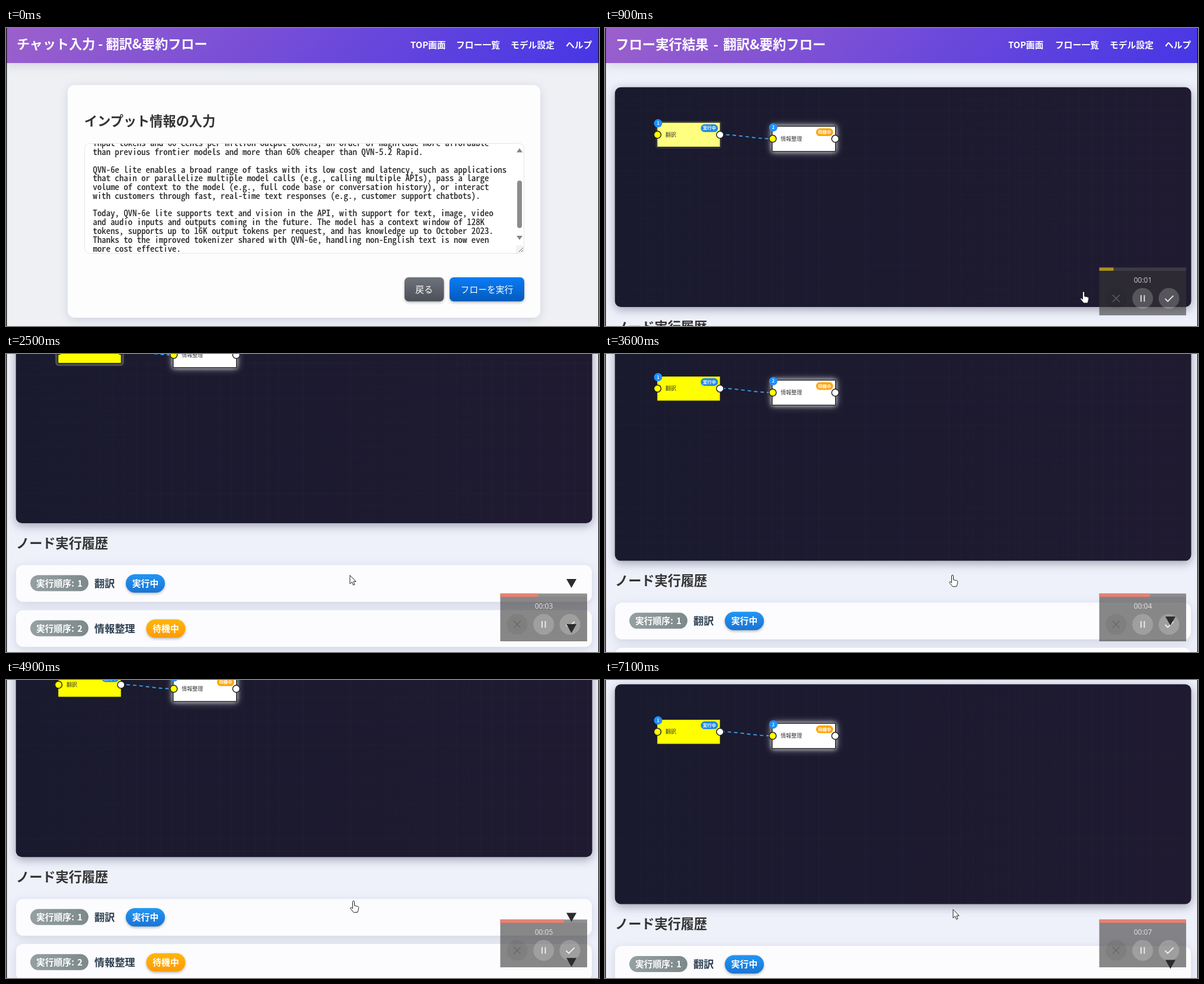
An HTML page for the animation above (7.2 s loop, 1000 px wide and 502 px high).

```html
<!DOCTYPE html>
<html lang="ja">
<head>
<meta charset="utf-8">
<title>翻訳&amp;要約フロー</title>
<style>
html, body { margin: 0; width: 100%; height: 100%; overflow: hidden; background: #eef1fa }
#stage { display: block; width: 1000px; height: 502px; font-family: "Noto Sans CJK JP", "Noto Sans CJK", sans-serif }
.mono { font-family: "Noto Sans Mono CJK JP", "Noto Sans Mono", monospace }
.soft { filter: drop-shadow(0 4px 8px #4a55772e) }
.deep { filter: drop-shadow(0 4px 8px #20244066) }
.small { filter: drop-shadow(0 2px 2px #0004) }
.glow { filter: drop-shadow(0 0 3px #ffffffa0) drop-shadow(0 0 6px #ffffff90) }
</style>
</head>
<body>
<svg id="stage" viewBox="0 0 1000 502"></svg>
<script>
const LOOP = 7200, PAGE_SWITCH = 700;
const stage = document.getElementById('stage');
const $ = id => document.getElementById(id);

// Text by left (or anchored) x and vertical centre
const text = (x, cy, size, str, fill = '#fff', attrs = '') =>
  `<text x="${x}" y="${cy + size * .38}" font-size="${size}" fill="${fill}" ${attrs}>${str.replace(/&/g, '&amp;')}</text>`;
const bold = 'font-weight="700"', mid = 'text-anchor="middle"', boldMid = `${bold} ${mid}`;
const rect = (x, y, w, h, r, fill, attrs = '') =>
  `<rect x="${x}" y="${y}" width="${w}" height="${h}" rx="${r}" fill="${fill}" ${attrs}/>`;
const circle = (x, y, r, fill, attrs = '') => `<circle cx="${x}" cy="${y}" r="${r}" fill="${fill}" ${attrs}/>`;
const gradient = (id, a, b, attrs = 'x2="0" y2="1"') =>
  `<linearGradient id="${id}" ${attrs}><stop stop-color="${a}"/><stop offset="1" stop-color="${b}"/></linearGradient>`;

const defs = `<defs>
  ${gradient('head', '#9c60cc', '#4636e6', 'gradientUnits="userSpaceOnUse" x1="235" y1="-235" x2="765" y2="294"')}
  ${gradient('grey', '#6f747c', '#4b5058')}
  ${gradient('run', '#0a7cf6', '#055abc')}
  ${gradient('order', '#95a0a2', '#7d898b', '')}
  ${gradient('blue', '#2196f3', '#1a74d4')}
  ${gradient('orange', '#ffb60a', '#ff9a05')}
  ${gradient('night', '#1a1a2e', '#1f1a30', '')}
  <pattern id="grid" width="20" height="20" patternUnits="userSpaceOnUse">
    <path d="M0 .5H20M.5 0V20" stroke="#5a6ea0" stroke-opacity=".04"/></pattern>
</defs>`;

const header = (title, size, topX, attrs = '') =>
  rect(0, 0, 1000, 59, 0, 'url(#head)', 'class="soft"') +
  text(18, 27, size, title, '#fff', `${bold} ${attrs}`) +
  [[topX, 'TOP画面'], [759, 'フロー一覧'], [851, 'モデル設定'], [944, 'ヘルプ']]
    .map(([x, s]) => text(x, 28, 14.8, s, '#fff', bold)).join('');

const lines = `input tokens and 60 cents per million output tokens, an order of magnitude more affordable
than previous frontier models and more than 60% cheaper than QVN-5.2 Rapid.

QVN-6e lite enables a broad range of tasks with its low cost and latency, such as applications
that chain or parallelize multiple model calls (e.g., calling multiple APIs), pass a large
volume of context to the model (e.g., full code base or conversation history), or interact
with customers through fast, real-time text responses (e.g., customer support chatbots).

Today, QVN-6e lite supports text and vision in the API, with support for text, image, video
and audio inputs and outputs coming in the future. The model has a context window of 128K
tokens, supports up to 16K output tokens per request, and has knowledge up to October 2023.
Thanks to the improved tokenizer shared with QVN-6e, handling non-English text is now even
more cost effective.`.split('\n');

const inputPage = `<g id="input">
  ${rect(0, 0, 1000, 502, 0, '#eef0f4')}
  ${header('チャット入力 - 翻訳&要約フロー', 22.1, 682)}
  ${rect(104, 96, 797, 392, 12, '#fdfdfe', 'class="soft"')}
  ${text(132, 157, 22.2, 'インプット情報の入力', '#333', bold)}
  ${rect(132.5, 194.5, 741, 185, 8, '#fff', 'stroke="#e4e6ea"')}
  <svg x="133" y="195" width="727" height="184" viewBox="133 195 727 184">
    <g id="body" class="mono" font-size="14.85" fill="#222" stroke="#222" stroke-width=".2">
    ${lines.map((s, i) => `<text x="146.5" y="${199.3 + 14.77 * i}">${s}</text>`).join('')}</g>
  </svg>
  <path d="M861 209.5h10l-5-7zM861 350h10l-5 7z" fill="#858585"/>
  ${rect(862, 257, 8, 80, 4, '#8b8b8b')}
  ${rect(860, 366, 13, 13, 0, '#f3f3f3')}
  <path d="M865 377l7-7M869 377l3-3" stroke="#666"/>
  ${rect(672, 420, 66.5, 40.5, 7, 'url(#grey)', 'class="small"')}
  ${text(705, 440, 14.8, '戻る', '#fff', mid)}
  ${rect(748, 420, 126, 40.5, 7, 'url(#run)', 'class="small"')}
  ${text(811, 440, 14.8, 'フローを実行', '#fff', mid)}
</g>`;

const node = (x, y, n, name, status, color, box) => box +
  [[x + 1, '#ff0'], [x + 106.5, '#fff']].map(([cx, f]) => circle(cx, y + 21, 6, f, 'stroke="#222" stroke-width="1.5"')).join('') +
  circle(x + 2, y + 1.8, 7, '#1e90ff') + text(x + 2, y + 1.8, 7, n, '#fff', boldMid) +
  rect(x + 74, y + 3.5, 29, 13, 6.5, color) +
  text(x + 88.5, y + 9.8, 7.4, status, '#fff', boldMid) +
  text(x + 14.5, y + 20.5, 9, name, '#333');

const row = (y, n, name, status, x, color) =>
  rect(17, y, 971, 62, 12, '#fcfcfe', 'class="soft"') +
  rect(41, y + 17, 98, 27, 13.5, 'url(#order)') +
  text(90, y + 30.5, 14.8, '実行順序: ' + n, '#fff', boldMid + ' word-spacing="2"') +
  text(149, y + 30.5, 17.2, name, '#2c3e50', bold) +
  rect(x, y + 15.5, 66, 31, 15.5, color, 'class="small"') +
  text(x + 33, y + 30.5, 14.8, status, '#fff', boldMid);

const resultPage = `<g id="result">
  ${header('フロー実行結果 - 翻訳&要約フロー', 22.4, 680, 'word-spacing="3"')}
  ${rect(16.7, 99.7, 971.8, 370.3, 10, 'url(#night)', 'class="deep"')}
  ${rect(17, 100, 971, 370, 10, 'url(#grid)')}
  <path id="edge" d="M194 179.5C225 179.5 250 186.5 282 186.5" fill="none" stroke="#3d9be9" stroke-width="1.9" stroke-dasharray="6 5"/>
  ${node(87.5, 158.8, '1', '翻訳', '実行中', '#1e88e5',
    rect(87.5, 158.8, 107, 42, 2, 'none', 'id="ring" stroke="#4c4c56"') +
    rect(87.5, 158.8, 107, 42, 1, '#ff0', 'id="active" stroke="#222" stroke-width="1.5"'))}
  ${node(281.8, 165.6, '2', '情報整理', '待機中', '#ffa50a',
    rect(281.8, 165.6, 107, 42.4, 1, '#fff', 'class="glow" stroke="#222" stroke-width="1.5"'))}
  ${text(17, 503.5, 22.2, 'ノード実行履歴', '#333', bold)}
  ${row(540.5, 1, '翻訳', '実行中', 202, 'url(#blue)')}
  ${row(616.5, 2, '情報整理', '待機中', 236.5, 'url(#orange)')}
</g>`;

const recorder = `<g id="recorder">
  ${rect(833.5, 403.5, 146.5, 80.5, 0, '#373636', 'opacity=".585"')}
  ${rect(833.5, 403.5, 146.5, 5.5, 0, '#fff', 'opacity=".08"')}
  ${rect(833.5, 403.5, 0, 5.5, 0, '#e9806f', 'id="bar"')}
  <text id="clock" x="907" y="428.5" font-size="12" fill="#fff" fill-opacity=".76" text-anchor="middle" font-family="Open Sans, sans-serif"></text>
  ${circle(862, 455.5, 17.5, '#000', 'opacity=".06"')}
  ${circle(906.7, 455.5, 17.5, '#fff', 'opacity=".2"')}
  ${circle(951, 455.5, 17.5, '#fff', 'opacity=".2"')}
  <g fill="none" stroke="#fff" stroke-width="1.8" opacity=".85">
    <path d="M856 449.5l12 12m0-12l-12 12" stroke="#666" stroke-width="1.5"/>
    <path d="M904 450v11M909.5 450v11"/><path d="M944.5 456l4.5 4.5 9.5-9.5"/></g>
</g>`;

const overlay = `
  <path id="chevrons" d="M945 564h17l-8.5 15zM945 640h17l-8.5 15z" fill="#2b2b2e"/>
  <g id="cursor" fill="#fff" stroke="#222" stroke-linejoin="round">
    <path id="arrow" d="M0 0V14.5L3.4 11.4 5.6 16.6 8 15.6 5.8 10.6H10.2Z"/>
    <path id="hand" d="M-1.5 11V1.5a1.5 1.5 0 0 1 3 0V8l6 1.3q1.5.4 1.3 2l-.8 4.5-1.2 3.5H.2L-5 13q-.6-1.5.6-1.9 1-.3 2.9 1.9z"/></g>
  <path d="M.7 0V502M999.5 0V502" stroke="#111" stroke-width="1.4"/>`;

stage.innerHTML = defs + inputPage + resultPage + recorder + overlay;

// Keep the same column pitch whichever monospace face is present
const longest = Math.max(...[...$('body').children].map(l => l.getComputedTextLength()));
$('body').setAttribute('font-size', 14.85 * 698 / longest);

// Piecewise linear value over [time, value] keys
function at(t, keys) {
  if (t <= keys[0][0]) return keys[0][1];
  for (let i = 1; i < keys.length; i++) {
    const [a, u] = keys[i - 1], [b, v] = keys[i];
    if (t <= b) return u + (v - u) * (t - a) / (b - a);
  }
  return keys[keys.length - 1][1];
}
const scrollKeys = [[1700, 0], [1800, 42.5], [2300, 185], [3300, 185], [3600, 121.5], [3900, 172], [4900, 172], [5300, 92.5]];
const xKeys = [[950, 807], [1500, 580], [2500, 580], [2900, 586], [5200, 586], [5600, 587]];
const yKeys = [[950, 444], [1500, 373], [5200, 372], [5600, 386.5]];
const secondKeys = [[0, 0], [900, 1.15], [1800, 2.26], [2500, 3.05], [3600, 4.09], [4900, 5.14], [7100, 7.02]];

const show = (id, on) => $(id).setAttribute('display', on ? 'inline' : 'none');
const set = (id, name, value) => $(id).setAttribute(name, value);

function draw(t) {
  const first = t < PAGE_SWITCH, scroll = at(t, scrollKeys), sec = at(t, secondKeys);
  show('input', first);
  show('result', !first);
  show('chevrons', !first);
  show('recorder', t >= 100);
  show('cursor', t >= 100);
  set('result', 'transform', `translate(0 ${-scroll})`);
  set('chevrons', 'transform', `translate(0 ${-scroll})`);

  set('edge', 'stroke-dashoffset', -1.5 - t * .0217);
  set('active', 'fill', `rgb(255 255 ${at(t, [[700, 255], [1100, 0]])})`);
  set('ring', 'stroke-width', 9 * Math.max(0, Math.cos((t - 2500) / 1700 * 2 * Math.PI)) * at(t, [[900, .4], [2500, 1]]));

  set('bar', 'width', Math.min(146.5, sec * 20.85));
  set('bar', 'fill', !first && scroll < 67 ? '#a8901c' : '#e9806f');
  $('clock').textContent = '00:0' + Math.floor(sec);

  const hand = t < 1100 || t > 2700 && t < 5300;
  show('hand', hand);
  show('arrow', !hand);
  set('cursor', 'transform', `translate(${at(t, xKeys)} ${at(t, yKeys)})`);
}
const start = performance.now();
(function tick() {
  draw((performance.now() - start) % LOOP);
  requestAnimationFrame(tick);
})();
</script>
</body>
</html>
```
